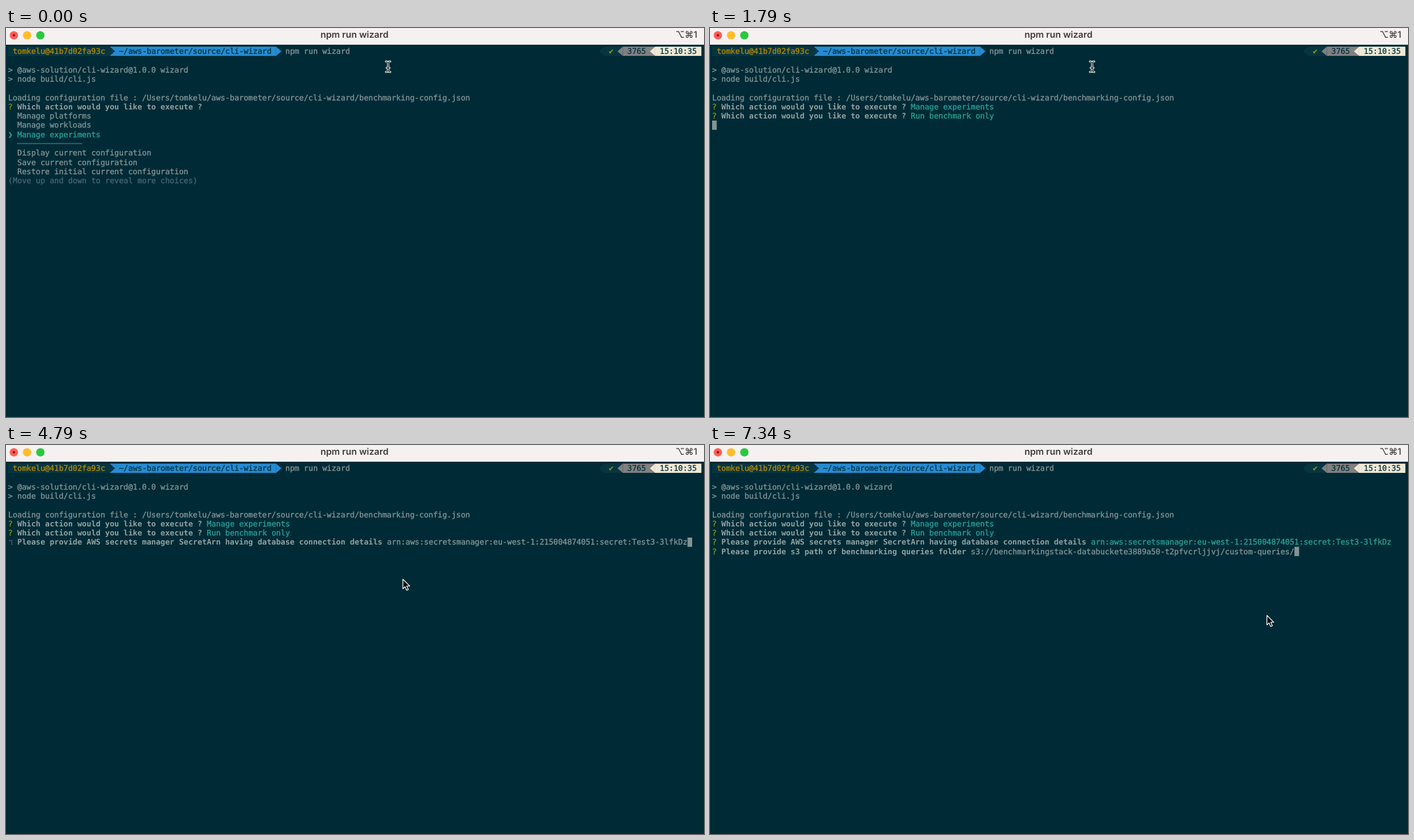
These frames come from a looping animation (1002x559 px, 8000 ms). An HTML page:

```html
<!DOCTYPE html>
<html lang="en">
<head>
<meta charset="utf-8">
<title>npm run wizard</title>
<style>
  html, body { margin: 0; width: 100%; height: 100%; overflow: hidden; background: #002b36; }
  svg { display: block; width: 1002px; height: 559px; }
  text { white-space: pre; text-rendering: geometricPrecision; }
  .term { font: 11.02px "DejaVu Sans Mono", monospace; }
  .term text { stroke-width: .3px; }
  .bar { font: 600 13px Inter, sans-serif; fill: #3d3b3b; }
  .base { fill: #839496; stroke: #839496; }
  .bold { fill: #93a1a1; font-weight: bold; }
  .pick { fill: #2aa198; stroke: #2aa198; }
  .mark { fill: #859900; stroke: #859900; }
  .dim { fill: #486570; stroke: #486570; }
  .user { fill: #b58900; stroke: #b58900; }
  .ink { fill: #073642; stroke: #073642; }
</style>
</head>
<body>
<svg viewBox="0 0 1002 559">
  <rect width="1002" height="559" fill="#002b36"/>
  <rect width="1002" height="24" fill="#f6f1f1"/>
  <circle cx="11.3" cy="10.4" r="6" fill="#fe5f57"/>
  <circle cx="11.3" cy="10.4" r="1.8" fill="#8a0f0a"/>
  <circle cx="30.3" cy="10.4" r="6" fill="#febc2e"/>
  <circle cx="49.3" cy="10.4" r="6" fill="#28c840"/>
  <g class="bar">
    <text x="500.3" y="14.3" text-anchor="middle">npm run wizard</text>
    <text x="992.5" y="14.3" text-anchor="end" style="font-weight:500">⌥⌘1</text>
  </g>
  <g class="term" id="fixed"></g>
  <g class="term" id="live"></g>
  <g id="ibeam" fill="none" stroke-linecap="round">
    <path id="beam" d="M545.5 48.2Q548.5 48.2 548.5 51V60.500Q548.5 63.200 545.5 63.200M551.500 48.2Q548.5 48.2 548.5 51M548.5 60.500Q548.5 63.200 551.500 63.200M546.500 57.500H550.500" stroke="#fff" stroke-width="2.800"/>
    <use href="#beam" style="display:none"/>
    <path d="M545.5 48.2Q548.5 48.2 548.5 51V60.500Q548.5 63.200 545.5 63.200M551.500 48.2Q548.5 48.2 548.5 51M548.5 60.500Q548.5 63.200 551.500 63.200M546.500 57.500H550.500" stroke="#000" stroke-width="1"/>
  </g>
  <path id="arrow" d="M0 0V13.700L3.100 10.800L5.300 15.900L7.700 14.900L5.500 9.900H9.700Z" fill="#000" stroke="#fff" stroke-width="1.100" stroke-linejoin="round"/>
</svg>
<script>
const LOOP = 8000, CELL = 6.635, ROW = 13.28, LEFT = 3, TOP = 26.8;
const NS = "http://www.w3.org/2000/svg";
const $ = id => document.getElementById(id);
const fixed = $("fixed"), live = $("live");
const colX = c => LEFT + c * CELL;
const rowY = r => TOP + r * ROW;

function add(parent, tag, attrs, text) {
  const el = document.createElementNS(NS, tag);
  for (const k in attrs) el.setAttribute(k, attrs[k]);
  if (text) el.textContent = text;
  parent.append(el);
}

function put(parent, row, col, cls, text) {
  add(parent, "text", { x: colX(col), y: rowY(row) + 10.4, class: cls }, text);
}

function block(parent, row, from, to, fill) {
  add(parent, "rect", { x: colX(from), y: rowY(row), width: (to - from) * CELL, height: ROW, fill });
}

// Powerline separator; dir 1 points right, -1 points left.
function wedge(col, dir, fill) {
  const back = colX(dir > 0 ? col : col + 1), tip = back + dir * 7.6;
  const y = rowY(0);
  add(fixed, "path", { d: `M${back} ${y}L${tip} ${y + ROW / 2}L${back} ${y + ROW}Z`, fill });
}

// Draws [class, text] pairs one after another on a row.
function line(parent, row, ...parts) {
  let col = 0;
  for (const [cls, text] of parts) {
    put(parent, row, col, cls, text);
    col += text.length;
  }
  return col;
}

function drawFixed() {
  const dark = "#073642", blue = "#268bd2", gray = "#808080", pale = "#eee8d5";
  block(fixed, 0, 0, 22, dark);
  block(fixed, 0, 22, 58, blue);
  wedge(22, 1, dark);
  wedge(58, 1, blue);
  put(fixed, 0, 1, "user", "tomkelu@41b7d02fa93c");
  put(fixed, 0, 24, "ink", "~/aws-barometer/source/cli-wizard");
  put(fixed, 0, 60, "base", "npm run wizard");

  wedge(128, -1, dark);
  block(fixed, 0, 129, 133, dark);
  block(fixed, 0, 133, 140, gray);
  block(fixed, 0, 140, 150, pale);
  wedge(132, -1, gray);
  wedge(139, -1, pale);
  put(fixed, 0, 130, "mark", "✔");
  put(fixed, 0, 134, "ink", "3765");
  put(fixed, 0, 141, "ink", "15:10:35");

  put(fixed, 2, 0, "base", "> @aws-solution/cli-wizard@1.0.0 wizard");
  put(fixed, 3, 0, "base", "> node build/cli.js");
  put(fixed, 5, 0, "base", "Loading configuration file : /Users/tomkelu/aws-barometer/source/cli-wizard/benchmarking-config.json");
}

const ACTION = "Which action would you like to execute ? ";
const SECRET = "Please provide AWS secrets manager SecretArn having database connection details ";
const FOLDER = "Please provide s3 path of benchmarking queries folder ";
const ARN = "arn:aws:secretsmanager:eu-west-1:215004874051:secret:Test3-3lfkDz";
const BUCKET = "s3://benchmarkingstack-databuckete3889a50-t2pfvcrljjvj/custom-queries/";
const RULE = "─".repeat(14);
const MAIN_MENU = ["Manage platforms", "Manage workloads", "Manage experiments", RULE,
  "Display current configuration", "Save current configuration", "Restore initial current configuration"];
const RUN_MENU = ["Add an experiment", "Run an experiment", "Run benchmark only", RULE,
  "Return to the previous menu", "Exit CLI", RULE];

const ask = (row, question, cls = "base", answer = "", mark = "?") =>
  line(live, row, ["mark", mark + " "], ["bold", question], [cls, answer]);

const caret = (row, col) => block(live, row, col, col + 1, "#839496");

function menu(row, items, chosen) {
  items.forEach((item, i) => {
    const on = i === chosen;
    if (on) put(live, row + i, 0, "pick", "❯");
    put(live, row + i, 2, on ? "pick" : item === RULE ? "dim" : "base", item);
  });
}

// Braille dots 1-6: left column top to bottom, then the right column.
function spinner(row, dots) {
  for (const d of dots) {
    const i = d - 1;
    add(live, "circle", { cx: i < 3 ? 5.7 : 8.4, cy: rowY(row) + 4.1 + (i % 3) * 2.5, r: .75, fill: "#839496" });
  }
}

function mainMenu() {
  ask(6, ACTION);
  menu(7, MAIN_MENU, 2);
  put(live, 14, 0, "dim", "(Move up and down to reveal more choices)");
}

function runMenu(chosen, hint) {
  ask(6, ACTION, "pick", "Manage experiments");
  ask(7, ACTION, "dim", hint);
  menu(8, RUN_MENU, chosen);
}

function answered() {
  ask(6, ACTION, "pick", "Manage experiments");
  ask(7, ACTION, "pick", "Run benchmark only");
}

function secret(answer, dots) {
  answered();
  caret(8, ask(8, SECRET, "base", answer, dots ? " " : "?"));
  if (dots) spinner(8, dots);
}

function folder(path) {
  answered();
  ask(8, SECRET, "pick", ARN);
  caret(9, ask(9, FOLDER, "base", path));
}

const BRAILLE = [[1, 2, 4], [1, 4, 5, 6], [3, 4, 5, 6], [3, 5, 6], [1, 2, 3],
  [1, 2, 3, 4], [1, 4, 5], [4, 5, 6], [3, 5, 6]];

const STEPS = [
  [0, mainMenu],
  [750, () => runMenu(0, "(Use arrow keys)")],
  [1200, () => runMenu(1, "")],
  [1340, () => runMenu(2, "")],
  [1790, () => { answered(); caret(8, 0); }],
  [2990, () => secret("")],
  [3740, () => secret(ARN)],
  ...BRAILLE.map((dots, i) => [4640 + i * 150, () => secret(ARN, dots)]),
  [5990, () => folder("")],
  [7340, () => folder(BUCKET)],
];

function pointer(t) {
  const pos = t >= 7340 ? [799.5, 244.8] : t >= 3740 && t < 5990 ? [569.8, 192.8] : null;
  $("ibeam").style.display = t < 3740 ? "" : "none";
  $("arrow").style.display = pos ? "" : "none";
  if (pos) $("arrow").setAttribute("transform", `translate(${pos})`);
}

let shown = -1;
const start = performance.now();

function frame() {
  const t = Math.max(0, performance.now() - start) % LOOP;
  const now = STEPS.findLastIndex(step => step[0] <= t);
  if (now !== shown) {
    shown = now;
    live.replaceChildren();
    STEPS[now][1]();
    pointer(t);
  }
  requestAnimationFrame(frame);
}

drawFixed();
frame();
</script>
</body>
</html>
```
